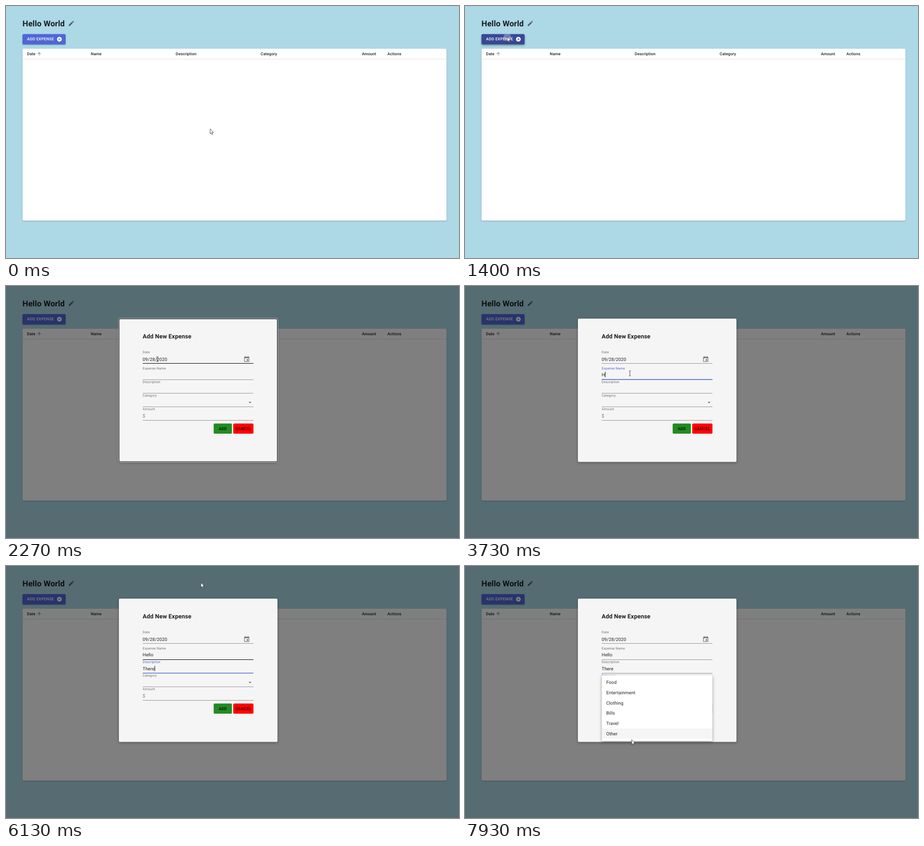
Animation of 1003 by 558 pixels, one loop 8 s. Source, as an HTML page:

```html
<!DOCTYPE html>
<html lang="en">
<head>
<meta charset="utf-8">
<title>Expense form</title>
<style>
  /* --t is the loop clock in ms; --f and --h are focus and hover amounts */
  @property --t { syntax: "<number>"; inherits: true; initial-value: 0; }
  @property --f { syntax: "<number>"; inherits: true; initial-value: 0; }
  @property --h { syntax: "<number>"; inherits: true; initial-value: 0; }
  @property --beam { syntax: "<number>"; inherits: true; initial-value: 0; }

  html, body { margin: 0; width: 100%; height: 100%; overflow: hidden; background: #add8e6; }
  svg {
    --main: #4e67d6;
    --dark: #374896;
    --loop: 8s infinite;
    display: block;
    width: 1003px;
    height: 558px;
    font: 10.07px Roboto, sans-serif;
    letter-spacing: .0094em;
    text-rendering: geometricPrecision;
    animation: clock var(--loop) linear;
  }
  text { fill: rgba(0, 0, 0, .87); white-space: pre; }
  .title { font-weight: 700; letter-spacing: .0075em; }
  .head text { font-size: 8.81px; font-weight: 500; letter-spacing: .0107em; }
  .cap { font-size: 8.81px; font-weight: 500; letter-spacing: .0286em; }
  .icon { fill: rgba(0, 0, 0, .54); }

  .card { fill: #fff; filter: drop-shadow(0 1px 1px rgba(0, 0, 0, .3)); }
  .add-btn { fill: var(--main); animation: btn var(--loop) ease-in-out; }
  .ripple {
    fill: #fff;
    transform-origin: 93.5px 69px;
    animation: spread var(--loop) cubic-bezier(.4, 0, .2, 1), fade var(--loop) ease-in-out;
  }
  .dialog { animation: open var(--loop) step-end; }
  .panel { fill: #f5f5f5; filter: drop-shadow(0 2px 3px rgba(0, 0, 0, .3)); }
  .ring { fill: none; animation: ring var(--loop) step-end; }

  .label {
    font-size: 7.55px;
    fill: color-mix(in srgb, var(--main) calc(var(--f) * 100%), rgba(0, 0, 0, .54));
  }
  .line { fill: rgba(0, 0, 0, .42); }
  .over { fill: rgba(0, 0, 0, .87); opacity: var(--h); }
  .focus { fill: var(--main); transform-origin: 425px 0; transform: scaleX(var(--f)); }
  .date { animation: date-hover var(--loop); }
  .name { animation: name-focus var(--loop), name-hover var(--loop); }
  .desc { animation: desc-focus var(--loop); }
  .cat  { animation: cat-focus var(--loop), cat-hover var(--loop); }

  .typed { line-height: 14px; white-space: nowrap; color: rgba(0, 0, 0, .87); }
  .typed span {
    font-size: calc(clamp(0, var(--t) - var(--at), 1) * 10.07px);
    letter-spacing: .0094em;
  }
  .typed i { display: inline-block; width: .8px; height: 12px; vertical-align: -2.3px; background: #000; }
  .name i { animation: name-caret var(--loop) step-end; }
  .desc i { animation: desc-caret var(--loop) step-end; }

  .menu { transform-origin: 425px 258px; animation: menu var(--loop) cubic-bezier(.4, 0, .2, 1); }
  .paper { fill: #fff; filter: drop-shadow(0 2px 3px rgba(0, 0, 0, .4)); }
  .item rect {
    --in: calc(7363 + 90 * var(--i));
    fill: rgba(0, 0, 0, .04);
    opacity: clamp(0, min((var(--t) - var(--in)) / 100, 1 - (var(--t) - var(--in) - 90) / 100), 1);
  }
  .item:last-child rect { opacity: clamp(0, (var(--t) - var(--in)) / 100, 1); }
  .item { transform: translateY(calc(var(--i) * 22.64px)); }

  .cursor { animation: move var(--loop) ease-in-out, shape var(--loop) step-end; }
  .arrow { fill: #fff; stroke: #111; stroke-width: .75; opacity: calc(1 - var(--beam)); }
  .beam { fill: none; stroke: #111; stroke-width: .8; opacity: var(--beam); }

  @keyframes clock { to { --t: 8000; } }
  @keyframes btn {
    0%, 7.75%, 21.5%, 100% { fill: var(--main); filter: drop-shadow(0 1px 1px rgba(0, 0, 0, .35)); }
    10.88%, 18.375% { fill: var(--dark); filter: drop-shadow(0 2px 2px rgba(0, 0, 0, .4)); }
  }
  @keyframes spread {
    0%, 16.1% { transform: scale(0); }
    23%, 100% { transform: scale(1); }
  }
  @keyframes fade {
    0%, 18.4% { opacity: .3; }
    24%, 100% { opacity: 0; }
  }
  @keyframes open { 0% { visibility: hidden; } 18.375%, 100% { visibility: visible; } }
  @keyframes ring { 0% { opacity: 1; } 33.75%, 100% { opacity: 0; } }
  @keyframes date-hover {
    0%, 26.5%, 31.5%, 100% { --h: 0; }
    28%, 29.5% { --h: 1; }
  }
  @keyframes name-hover {
    0%, 31% { --h: 0; }
    33%, 76.7% { --h: 1; }
    79.1%, 100% { --h: 0; }
  }
  @keyframes cat-hover { 0%, 85.8% { --h: 0; } 88%, 100% { --h: 1; } }
  @keyframes name-focus {
    0%, 33.75%, 65%, 100% { --f: 0; }
    36.25%, 62.5% { --f: 1; }
  }
  @keyframes desc-focus {
    0%, 62.5%, 90.9%, 100% { --f: 0; }
    65%, 88.4% { --f: 1; }
  }
  @keyframes cat-focus { 0%, 88.4% { --f: 0; } 90.9%, 100% { --f: 1; } }
  @keyframes name-caret {
    0%, 40%, 61.625%, 100% { opacity: 0; }
    33.75%, 46.625% { opacity: 1; }
  }
  @keyframes desc-caret {
    0%, 77.9%, 88.4%, 100% { opacity: 0; }
    62.5%, 84.1% { opacity: 1; }
  }
  @keyframes menu {
    0%, 88.4% { opacity: 0; transform: scale(.75, .5625); }
    91.9%, 100% { opacity: 1; transform: none; }
  }
  @keyframes shape {
    0%, 29.5%, 76.625%, 100% { --beam: 0; }
    27.5%, 31.8% { --beam: 1; }
  }
  @keyframes move {
    0%, .875% { transform: translate(452px, 272px); }
    9%, 19.6% { transform: translate(93.5px, 68px); }
    27.5% { transform: translate(333px, 157px); animation-timing-function: linear; }
    28.375% { transform: translate(335px, 162px); }
    32.5%, 76.62% { transform: translate(365px, 193.5px); }
    76.625%, 82.5% { transform: translate(431.5px, 36.5px); }
    83.5% { transform: translate(436px, 27px); }
    86.6% { transform: translate(477px, 256px); }
    92.5% { transform: translate(477px, 256px); animation-timing-function: linear; }
    98.1%, 99.12% { transform: translate(329px, 369px); }
    99.125%, 100% { transform: translate(369px, 384.5px); }
  }
</style>
</head>
<body>
<svg viewBox="0 0 1003 558">
  <defs>
    <clipPath id="btn-clip"><rect x="36.6" y="62.3" width="95.4" height="22.8" rx="2.5"/></clipPath>
  </defs>
  <rect width="1003" height="558" fill="#add8e6"/>
  <rect width="1003" height="1" fill="rgba(0,0,0,.04)"/>

  <text class="title" x="36.5" y="44.9" font-size="17.7">Hello World</text>
  <path class="icon" transform="translate(137.1 31) scale(.629)" d="M3 17.25V21h3.75L17.81 9.94l-3.75-3.75L3 17.25zM20.71 7.04c.39-.39.39-1.02 0-1.41l-2.34-2.34c-.39-.39-1.02-.39-1.41 0l-1.83 1.83 3.75 3.75 1.83-1.83z"/>

  <rect class="add-btn" x="36.6" y="62.3" width="95.4" height="22.8" rx="2.5"/>
  <text class="cap" x="46.6" y="76.4" style="fill:#fff">ADD EXPENSE</text>
  <path fill="#fff" transform="translate(111.9 67.2) scale(.524)" d="M12 2a10 10 0 1 0 0 20 10 10 0 1 0 0-20zm5 11h-4v4h-2v-4H7v-2h4V7h2v4h4v2z"/>
  <g clip-path="url(#btn-clip)"><circle class="ripple" cx="93.5" cy="69" r="60"/></g>

  <rect class="card" x="36.6" y="94.5" width="938.8" height="380.8" rx="2.5"/>
  <rect x="36.6" y="117" width="938.8" height="1" fill="#e0e0e0"/>
  <g class="head">
    <text x="46.6" y="109">Date</text>
    <text x="187.8" y="109">Name</text>
    <text x="375.8" y="109">Description</text>
    <text x="563.8" y="109">Category</text>
    <text x="819.5" y="109" text-anchor="end">Amount</text>
    <text x="844.6" y="109">Actions</text>
  </g>
  <path class="icon" transform="translate(67.8 100.4) scale(.472)" d="M4 12l1.41 1.41L11 7.83V20h2V7.83l5.58 5.59L20 12l-8-8-8 8z"/>

  <g class="dialog">
    <rect width="1003" height="558" fill="rgba(0,0,0,.5)"/>
    <rect class="panel" x="250" y="72.2" width="351" height="317.2" rx="2.5"/>
    <g class="ring">
      <rect x="249.2" y="71.4" width="352.6" height="318.8" rx="3" stroke="#fff"/>
      <rect x="250.3" y="72.5" width="350.4" height="316.6" rx="2.2" stroke="#101010" stroke-width="1.3"/>
    </g>
    <text class="title" x="302.6" y="115.7" font-size="13.2">Add New Expense</text>

    <g class="date">
      <text class="label" x="302.6" y="149.2">Date</text>
      <text x="302.6" y="165.6">09/28/2020</text>
      <path class="icon" transform="translate(525.4 154.8) scale(.629)" d="M17 12h-5v5h5v-5zM16 1v2H8V1H6v2H5c-1.11 0-1.99.9-1.99 2L3 19c0 1.1.89 2 2 2h14c1.1 0 2-.9 2-2V5c0-1.1-.9-2-2-2h-1V1h-2zm3 18H5V8h14v11z"/>
      <rect class="line" x="302.8" y="171" width="245" height="1"/>
      <rect class="over" x="302.8" y="170.8" width="245" height="1.2"/>
    </g>

    <g class="name">
      <text class="label" x="302.6" y="184.6">Expense Name</text>
      <rect class="line" x="302.8" y="207" width="245" height="1"/>
      <rect class="over" x="302.8" y="206.8" width="245" height="1.2"/>
      <rect class="focus" x="302.8" y="206.4" width="245" height="1.6"/>
      <foreignObject x="302.6" y="190.4" width="240" height="14">
        <div class="typed"><span style="--at:3729">H</span><span style="--at:3929">e</span><span style="--at:3999">l</span><span style="--at:4129">l</span><span style="--at:4399">o</span><i></i></div>
      </foreignObject>
    </g>

    <g class="desc">
      <text class="label" x="302.6" y="214.7">Description</text>
      <rect class="line" x="302.8" y="237" width="245" height="1"/>
      <rect class="focus" x="302.8" y="236.5" width="245" height="1.5"/>
      <foreignObject x="302.6" y="220.6" width="240" height="14">
        <div class="typed"><span style="--at:5269">T</span><span style="--at:5469">h</span><span style="--at:5529">e</span><span style="--at:5629">r</span><span style="--at:5729">e</span><i></i></div>
      </foreignObject>
    </g>

    <g class="cat">
      <text class="label" x="302.6" y="244.9">Category</text>
      <path class="icon" transform="translate(532.9 250.2) scale(.629)" d="M7 10l5 5 5-5z"/>
      <rect class="line" x="302.8" y="267" width="245" height="1"/>
      <rect class="over" x="302.8" y="266.8" width="245" height="1.2"/>
      <rect class="focus" x="302.8" y="266.6" width="245" height="1.4"/>
    </g>

    <text class="label" x="302.6" y="275.1">Amount</text>
    <text x="302.6" y="291.4" style="fill:rgba(0,0,0,.54)">$</text>
    <rect class="line" x="302.8" y="297" width="245" height="1"/>

    <rect x="459.8" y="304.4" width="40.3" height="22.7" rx="2.5" fill="#228b22"/>
    <text class="cap" x="471" y="318.6">ADD</text>
    <rect x="503.1" y="304.4" width="44.8" height="22.7" rx="2.5" fill="#f00"/>
    <text class="cap" x="508.1" y="318.6">CANCEL</text>
  </g>

  <g class="menu">
    <rect class="paper" x="302.8" y="241.8" width="245" height="145.8" rx="2.5"/>
    <g class="item" style="--i:0"><rect x="302.8" y="246.6" width="245" height="22.64"/><text x="312.7" y="261.4">Food</text></g>
    <g class="item" style="--i:1"><rect x="302.8" y="246.6" width="245" height="22.64"/><text x="312.7" y="261.4">Entertainment</text></g>
    <g class="item" style="--i:2"><rect x="302.8" y="246.6" width="245" height="22.64"/><text x="312.7" y="261.4">Clothing</text></g>
    <g class="item" style="--i:3"><rect x="302.8" y="246.6" width="245" height="22.64"/><text x="312.7" y="261.4">Bills</text></g>
    <g class="item" style="--i:4"><rect x="302.8" y="246.6" width="245" height="22.64"/><text x="312.7" y="261.4">Travel</text></g>
    <g class="item" style="--i:5"><rect x="302.8" y="246.6" width="245" height="22.64"/><text x="312.7" y="261.4">Other</text></g>
  </g>

  <g class="cursor">
    <path class="arrow" d="M0 0V11L2.5 8.8L4.2 12.5L6 11.7L4.3 8H7.6Z"/>
    <path class="beam" d="M-2.2-5.3h1.6l.6.5.6-.5h1.6M0-4.8v9.6M-2.2 5.3h1.6l.6-.5.6.5h1.6"/>
  </g>
</svg>
</body>
</html>
```
